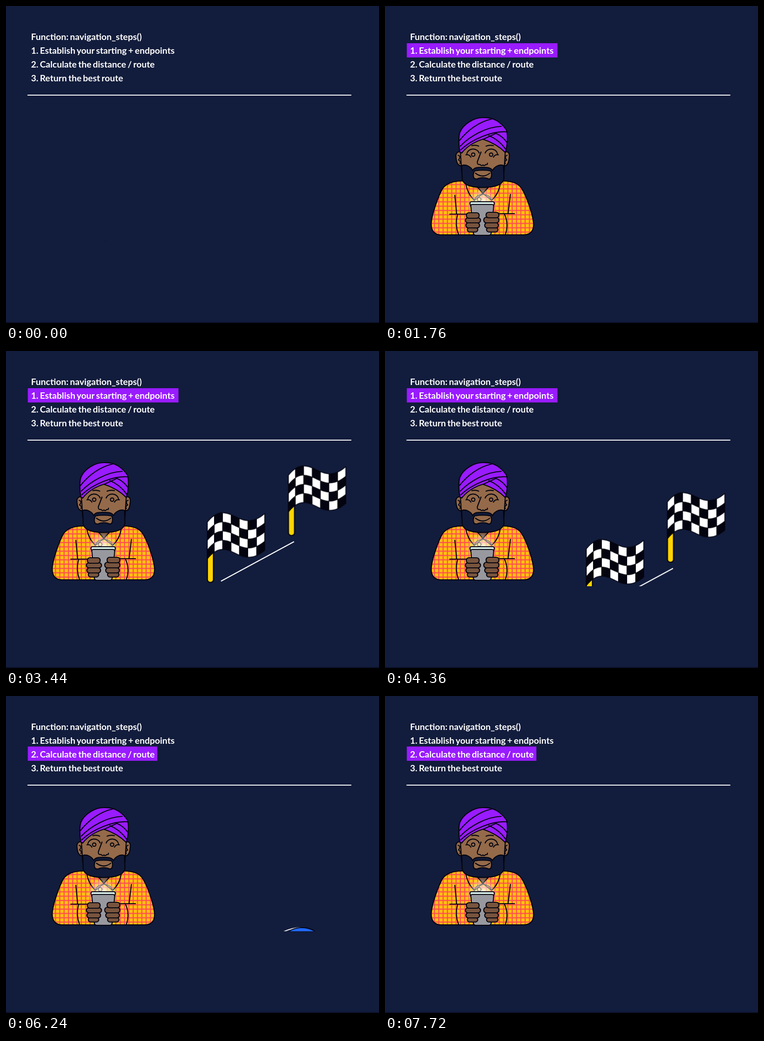
An HTML page that plays this animation: 812x690 px, repeating every 8 s.

```html
<!DOCTYPE html>
<html lang="en">
<head>
<meta charset="utf-8">
<title>Navigation steps</title>
<style>
  html, body { margin: 0; width: 100%; height: 100%; overflow: hidden; background: #121c3c; }
  svg { display: block; width: 812px; height: 690px; }
  text { font: 700 19.5px Lato, sans-serif; word-spacing: -1.5px; fill: #fff; }
  .ink { stroke: #03040f; stroke-width: 2.2; stroke-linecap: round; stroke-linejoin: round; }
  .none { fill: none; }
  .skin { fill: #946a4a; }
  .hand { fill: #78543e; }
  .halo { fill: none; stroke: #777b82; stroke-width: 1.6; }
</style>
</head>
<body>
<svg viewBox="0 0 812 690">
  <defs>
    <pattern id="plaid" x="103" y="384" width="9.4" height="9.4" patternUnits="userSpaceOnUse">
      <rect width="9.4" height="9.4" fill="#ffc20c"/>
      <path d="M0 4.700H9.400M4.700 0V9.400" stroke="#ff4a52" stroke-width="2.2"/>
    </pattern>
    <radialGradient id="glow">
      <stop offset=".2" stop-color="#fff" stop-opacity=".8"/>
      <stop offset="1" stop-color="#fff" stop-opacity="0"/>
    </radialGradient>
    <clipPath id="window"><rect width="812" height="512"/></clipPath>
    <g id="flag" class="ink"></g>
  </defs>

  <rect width="812" height="690" fill="#121c3c"/>
  <rect y="688.5" width="812" height="1.5" fill="#090d20"/>
  <rect id="mark" width="1" height="31" fill="#991bff"/>
  <g id="lines"></g>
  <path d="M47.500 194H751" stroke="#fff" stroke-width="2" stroke-linecap="round"/>

  <g clip-path="url(#window)">
    <g id="man" class="ink">
      <path fill="url(#plaid)" d="M168 381C150 381 134 385 125 398C117 412 103 450 101 470C99 490 109 498 121 498H302C318 498 325 488 323 470C320 448 308 415 299 400C292 386 275 381 257 381Z"/>
      <path class="hand" d="M197 389L213 408L230 389Z"/>
      <path class="none" d="M176 386C178 401 185 414 195 423L213 408L232 423C242 414 249 401 251 386M152 412L156 452M141 453H187M158 454C154 468 155 484 160 497M273 410L268 451M239 452H282M260 453C267 467 267 484 262 497"/>

      <path class="skin" d="M167 319C157 314 153 322 155 332C156 343 161 350 169 347ZM260 319C269 314 272 322 270 332C269 343 265 350 258 347Z"/>
      <path class="none" d="M159 325C165 326 163 332 160 335C164 337 165 340 163 343M266 325C260 326 262 332 265 335C261 337 260 340 262 343"/>
      <path class="skin" d="M164 314L213 286L262 314L259 362H167Z"/>
      <path class="none" d="M178 322A14 13 0 0 1 205 320M218 320A14 13 0 0 1 245 322M176 324Q183 322 187 329M247 324Q240 322 236 329M189 304Q197 302 204 305M220 305Q228 302 236 304"/>
      <circle class="none" cx="192" cy="323.5" r="3.7"/>
      <circle class="none" cx="231" cy="323.5" r="3.7"/>
      <path class="none" d="M209 318L201 339Q200 346 207 345Q210 349 213 346Q217 349 219 345Q224 346 223 342"/>
      <path fill="#111a38" d="M167 347C177 344 187 350 191 358C194 351 203 351 212 351C221 351 230 351 234 358C238 350 248 344 258 347L259 376C256 390 238 395 213 395C188 395 170 390 168 376Z"/>
      <path class="skin" d="M195 359Q213 356 230 359Q234 367 230 375Q226 378 222 375Q213 372 204 375Q199 378 194 375Q190 367 195 359Z"/>
      <path class="none" d="M197 364Q213 376 228 364"/>

      <path fill="#991bff" d="M163 318C160 302 160 284 163 275C170 258 192 243 213 243C240 242 253 255 264 269C268 280 267 302 262 319C249 306 232 296 213 290C194 296 178 306 167 320Z"/>
      <path class="none" d="M162 293C180 270 205 252 232 246M164 305C184 284 220 263 253 262M165 313C189 290 234 271 266 274M226 282Q248 291 263 312M241 277Q257 284 266 298M214 290Q227 284 240 278"/>

      <circle cx="211" cy="430" r="34" fill="url(#glow)" stroke="none"/>
      <path class="halo" d="M194 425C197 405 229 405 233 425"/>
      <circle class="halo" cx="205" cy="421" r="4"/>
      <path fill="#d5ebe5" d="M188 426H235Q238 426 238 430L236 437H187L185 430Q185 426 188 426Z"/>
      <path fill="#98989f" d="M190 432H233Q237 432 236.500 437L231 495Q230 499 226 499H197Q193 499 192.500 495L187 437Q186 432 190 432Z"/>
      <g id="fingers" class="hand"></g>
    </g>

    <g id="route">
      <path id="link" d="M0 0L159 -86" stroke="#fff" stroke-width="2.4" vector-effect="non-scaling-stroke"/>
      <use id="goal" href="#flag"/>
      <use id="start" href="#flag"/>
    </g>

    <g id="tools">
      <path class="none" stroke="#fff" stroke-width="2.2" d="M640 244C592 246 546 290 526 345C515 375 505 410 504 430C503 463 553 463 552 430C552 400 552 370 562 330C572 295 600 250 644 244"/>
      <g class="ink" transform="translate(471.500 299) rotate(45)">
        <rect y="-55.500" width="281" height="55.500" fill="#ffd500"/>
        <path id="ticks" class="none"/>
      </g>
      <path class="ink" fill="#1f69ff" d="M591 378V297A53 53 0 0 1 697 297V378Z"/>
      <g class="ink" transform="translate(644.500 296)">
        <circle r="39" fill="#fff"/>
        <path id="dial" class="none"/>
        <path fill="#fff" d="M-24 -1L0 -25L24.500 -1Z"/>
        <path fill="#ff1230" d="M-24 -1L0 23L24.500 -1Z"/>
      </g>
    </g>
  </g>
</svg>

<script>
const LOOP = 8000;
const EASE = 'cubic-bezier(.33, 0, .67, 1)';
const $ = id => document.getElementById(id);

function add(parent, tag, attrs, text = '') {
  const el = document.createElementNS('http://www.w3.org/2000/svg', tag);
  for (const key in attrs) el.setAttribute(key, attrs[key]);
  el.textContent = text;
  parent.append(el);
}

[
  'Function: navigation_steps()',
  '1. Establish your starting + endpoints',
  '2. Calculate the distance / route',
  '3. Return the best route'
].forEach((line, i) => add($('lines'), 'text', { x: 54.5, y: 73.5 + 30 * i }, line));

// x, y, width, height
[
  [179, 482, 23, 10], [176, 472, 30, 11], [175, 461, 33, 11], [177, 450, 28, 12],
  [221, 482, 25, 10], [217, 472, 30, 11], [215, 460, 33, 12], [220, 449, 28, 12]
].forEach(([x, y, width, height]) =>
  add($('fingers'), 'rect', { x, y, width, height, rx: 5.5 }));

// Height of the cloth's top edge at x
function wave(x) {
  if (x < 33) return 1 + 21 * ((33 - x) / 33) ** 2;
  if (x > 90) return 18 - 15 * ((x - 90) / 35) ** 2;
  return 9.5 - 8.5 * Math.cos(Math.PI * (x - 33) / 57);
}

function patch(x0, x1, y0, y1) {
  const top = [], bottom = [];
  const n = Math.ceil((x1 - x0) / 3);
  for (let i = 0; i <= n; i++) {
    const x = x0 + (x1 - x0) * i / n;
    top.push(`${x} ${wave(x) + y0}`);
    bottom.unshift(`${x} ${wave(x) + y1}`);
  }
  return `M${top.concat(bottom).join('L')}Z`;
}

const flag = $('flag');
add(flag, 'rect', { x: .5, y: 74, width: 13, height: 78, rx: 6, fill: '#ffd500' });
add(flag, 'path', { d: patch(.5, 125, 0, 79), fill: '#03040f' });
const edges = [.5, 15.5, 33.5, 52, 70, 88.5, 107.5, 125];
let cells = '';
for (let c = 0; c < 7; c++)
  for (let r = c % 2; r < 4; r += 2)
    cells += patch(edges[c] + .6, edges[c + 1] - .6, r * 19.8 + .6, r * 19.8 + 19.2);
add(flag, 'path', { d: cells, fill: '#fff', stroke: 'none' });

let ticks = '';
for (let i = 1; i < 17; i++)
  ticks += `M${i * 16.5} 0v${i % 4 ? -16 : -30}`;
$('ticks').setAttribute('d', ticks);

let dial = '';
for (let i = 0; i < 8; i++) {
  const x = Math.cos(i * Math.PI / 4), y = Math.sin(i * Math.PI / 4);
  dial += `M${39 * x} ${39 * y}L${31 * x} ${31 * y}`;
}
$('dial').setAttribute('d', dial);

// Steps are [ms, transform]; the first and last poses are held
function play(id, steps) {
  const frames = steps.map(([ms, transform]) => ({ offset: ms / LOOP, transform, easing: EASE }));
  frames.unshift({ ...frames[0], offset: 0 });
  frames.push({ ...frames.at(-1), offset: 1 });
  return $(id).animate(frames, { duration: LOOP, iterations: Infinity });
}

const at = (x, y, sx = 1, sy = sx) => `translate(${x}px, ${y}px) scale(${sx}, ${sy})`;

const anims = [
  play('man', [[80, at(0, 270)], [640, at(0, 0)]]),
  play('mark', [
    [1120, at(47.5, 81, 0, 1)], [1760, at(47.5, 81, 328, 1)],
    [5040, at(47.5, 81, 328, 1)], [5440, at(47.5, 110, 282, 1)]
  ]),
  play('route', [
    [2520, at(0, 158)], [2840, at(0, 0)],
    [4240, at(0, 0)], [4640, at(0, 264)]
  ]),
  play('start', [[2840, at(542, 355)], [3420, at(438, 351.5)]]),
  play('goal', [[2840, at(542, 355)], [3420, at(614.5, 249.5)]]),
  play('link', [[2840, at(549, 500, 0)], [3420, at(468, 501)]]),
  play('tools', [
    [6200, at(0, 270)], [6560, at(0, 0)],
    [7360, at(0, 0)], [7720, at(0, 270)]
  ])
];
const now = document.timeline.currentTime ?? 0;
anims.forEach(a => { a.startTime = now; });
</script>
</body>
</html>
```
